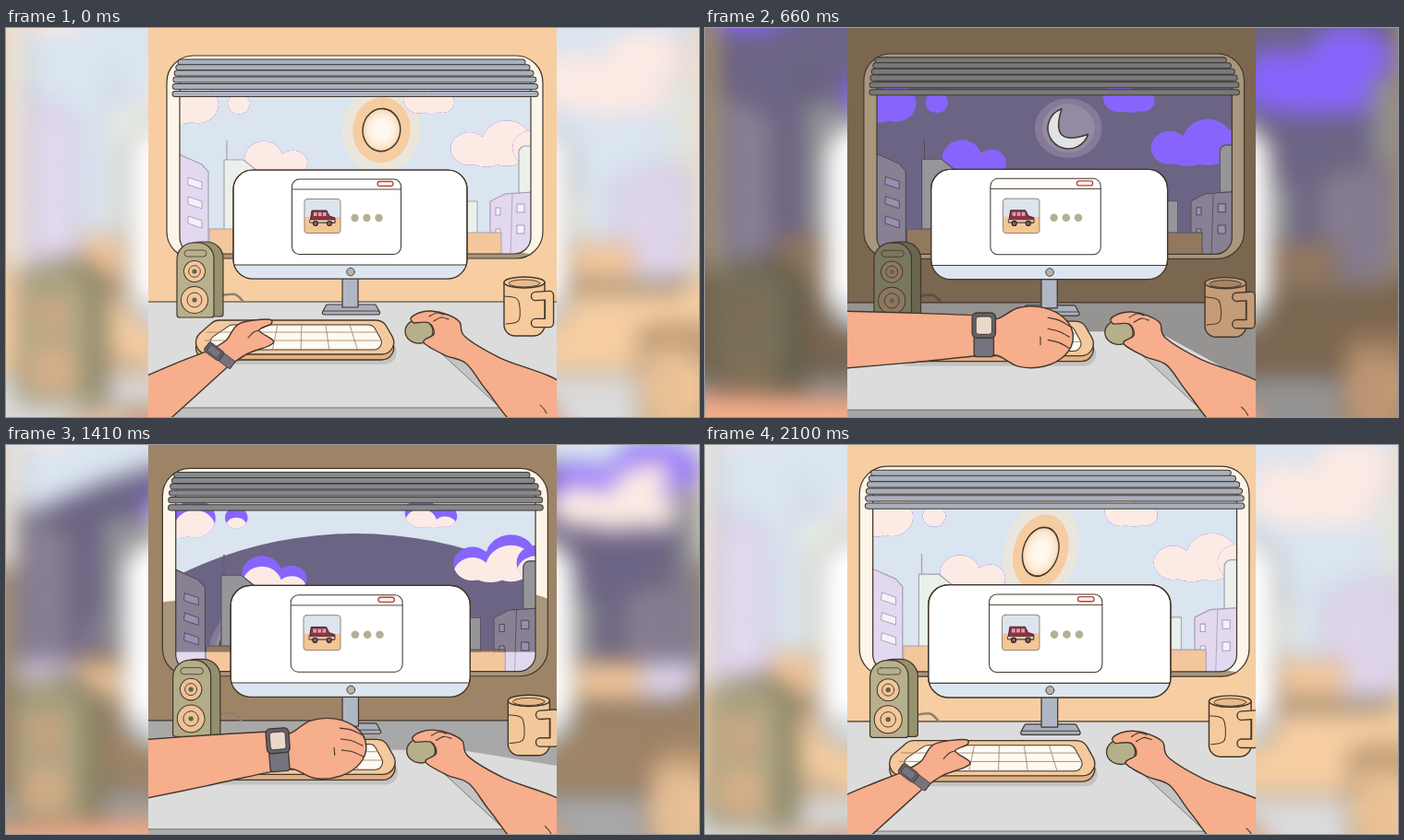
Recreate the animation shown at these times as an HTML page with a canvas. Size 750 by 422 pixels, loop 2.13 s.

```html
<!DOCTYPE html>
<html lang="en">
<head>
<meta charset="utf-8">
<title>Desk by day and night</title>
<style>
html, body { margin: 0; width: 100%; height: 100%; overflow: hidden; background: #ddd; }
canvas { display: block; width: 750px; height: 422px; }
</style>
</head>
<body>
<canvas id="stage" width="750" height="422"></canvas>
<script>
const LOOP = 2130, DAY = LOOP / 2;
const INK = '#43372c', SKIN = '#f6ae8c', CLAY = '#f4c99d', WHITE = '#fff';
const stage = document.getElementById('stage').getContext('2d');
const room = document.createElement('canvas');
room.width = 750;
room.height = 422;
const c = room.getContext('2d');

const lerp = (a, b, k) => a + (b - a) * k;
const ramp = (v, a, b) => Math.max(0, Math.min(1, (v - a) / (b - a)));
const smooth = k => k * k * (3 - 2 * k);
const rgb = h => [1, 3, 5].map(i => parseInt(h.slice(i, i + 2), 16));
function mix(a, b, k) {
  const q = rgb(b);
  return `rgb(${rgb(a).map((v, i) => Math.round(lerp(v, q[i], k)))})`;
}

function paint(path, fill, line = INK, width = 1.2) {
  if (fill) { c.fillStyle = fill; c.fill(path); }
  if (line) { c.strokeStyle = line; c.lineWidth = width; c.stroke(path); }
}
function poly(pts, fill, line, width) {
  const p = new Path2D();
  pts.forEach(q => p.lineTo(...q));
  if (fill) p.closePath();
  paint(p, fill, line, width);
}
function curve(pts, fill, line, width) {
  const p = new Path2D(), at = i => pts[Math.max(0, Math.min(pts.length - 1, i))];
  p.moveTo(...pts[0]);
  for (let i = 0; i < pts.length - 1; i++) {
    const [a, b, d, e] = [at(i - 1), at(i), at(i + 1), at(i + 2)];
    p.bezierCurveTo(b[0] + (d[0] - a[0]) / 6, b[1] + (d[1] - a[1]) / 6,
      d[0] - (e[0] - b[0]) / 6, d[1] - (e[1] - b[1]) / 6, ...d);
  }
  paint(p, fill, line, width);
}
// Trapezoid with rounded corners, given its upper and lower edge.
function slab(y1, l1, r1, y2, l2, r2, radius, fill, line, width) {
  const p = new Path2D();
  p.moveTo((l1 + r1) / 2, y1);
  [[r1, y1], [r2, y2], [l2, y2], [l1, y1]].forEach((q, i, all) => p.arcTo(...q, ...all[(i + 1) % 4], radius));
  p.closePath();
  paint(p, fill, line, width);
}
function box(x, y, w, h, r, fill, line, width) {
  const p = new Path2D();
  p.roundRect(x, y, w, h, r);
  paint(p, fill, line, width);
}
function oval(x, y, rx, ry, fill, line, width) {
  const p = new Path2D();
  p.ellipse(x, y, rx, ry, 0, 0, 7);
  paint(p, fill, line, width);
}
function clipped(addShape, draw) {
  c.save();
  c.beginPath();
  addShape();
  c.clip();
  draw();
  c.restore();
}

// A large lobe, a smaller one to the given side, and a base between them.
function cloud(x, y, r, side, shift) {
  const lobe = (dx, dy, rx, ry) => {
    c.moveTo(x + dx + rx, y + dy);
    c.ellipse(x + dx, y + dy, rx, ry, 0, 0, 7);
  };
  const shape = () => {
    lobe(0, 0, r, r * .92);
    lobe(side * r * 1.5, r * .22, r * .75, r * .66);
    lobe(side * r * .8, r * .5, r * .8, r * .45);
  };
  clipped(shape, () => {
    c.fillStyle = '#8765fd';
    c.fillRect(150, 30, 450, 150);
    c.translate(0, shift);
    c.beginPath();
    shape();
    c.fillStyle = '#fcebe4';
    c.fill();
  });
}
function clouds(shift) {
  cloud(542, 125, 27, -1, shift);
  cloud(568, 130, 20, 0, shift);
  cloud(279, 142, 21, 1, shift);
  cloud(208, 83, 22, -1, shift);
  cloud(252, 82, 12, 0, shift);
  cloud(447, 77, 17, 1, shift);
}

// Damped swing out from behind the screen; the setting mirrors the rising.
function orbit(p, rise, set, draw) {
  const age = Math.min(p - rise, set - p), side = p - rise < set - p ? 1 : -1;
  if (age <= 0) return;
  const pull = Math.exp(-age / 30), turn = side * 40 * pull;
  c.save();
  c.translate(393 - side * 140 * pull * Math.cos(age / 25), 110 + 100 * Math.exp(-age / 11));
  c.rotate(turn * Math.PI / 180);
  c.scale(1 - .35 * pull, 1 + .5 * pull);
  draw(turn);
  c.restore();
}
function sun() {
  oval(0, 0, 45, 44, '#ebe6dc', null);
  oval(0, 0, 33, 33, '#f6cda1', null);
  const g = c.createRadialGradient(0, 0, 8, 0, 0, 21);
  g.addColorStop(0, '#fff8f0');
  g.addColorStop(.6, '#fdebd7');
  g.addColorStop(1, '#f8d6b1');
  oval(0, 0, 21.5, 21.5, g, INK, 1.5);
}
function moon(turn) {
  oval(0, 0, 36, 32, '#857b98', null);
  oval(0, 0, 28, 26, '#938ba3', null);
  c.rotate((turn - 46) * Math.PI / 180);
  const p = new Path2D();
  p.arc(0, 0, 22, 1.1, -1.1);
  p.quadraticCurveTo(-30, 0, 22 * Math.cos(1.1), 22 * Math.sin(1.1));
  p.closePath();
  paint(p, '#dfe3e4', INK, 1.5);
}

function city(night) {
  const pick = (day, dark) => night ? dark : day;
  const violet = pick('#e2d8f0', '#888093'), pale = pick('#eaf1ea', '#96969a'), clay = pick('#f3c79b', '#92785f');
  const edge = pick('#a79fb4', '#514a59'), glass = pick('#f5f1fa', '#9a8fb2');
  const block = (x, y, w, h, color) => box(x, y, w, h, 0, color, edge, 1);
  poly([[185, 136], [212, 148], [219, 156], [219, 250], [185, 250]], violet, edge);
  for (let y = 162; y < 210; y += 21) poly([[197, y], [212, y + 5], [212, y + 13], [197, y + 8]], glass, edge, .9);
  poly([[239, 122], [239, 145]], null, edge);
  poly([[236, 220], [236, 143], [257, 143], [272, 155], [272, 220]], pale, edge);
  block(220, 218, 36, 30, clay);
  box(555, 128, 30, 70, 7, pale, edge);
  block(490, 188, 20, 37, pale);
  poly([[524, 250], [524, 188], [540, 180], [570, 178], [570, 250]], violet, edge);
  poly([[548, 180], [546, 245]], null, edge, .8);
  for (const y of [191, 214]) {
    block(553, y, 8, 9, glass);
    block(530, y + 4, 5, 8, glass);
  }
  block(490, 222, 46, 26, clay);
}

function windowView(p, n, sweep) {
  const outer = [174, 30, 407, 220, 29], inner = [188, 39, 380, 206, 18];
  box(...outer, '#fdf5e9', null);
  clipped(() => c.roundRect(...outer), () => {
    const y = 250 - 220 * sweep(333, 370, 918, 955);
    curve([[165, y], [378, y - 20], [590, y], [590, 290], [165, 290]], '#a8977d', null);
  });
  box(...outer, null);
  clipped(() => c.roundRect(...inner), () => {
    const sky = ['#dae5f0', '#6c6484'], dusk = p < 600;
    const grow = dusk ? ramp(p, 328, 368) : ramp(p, 921, 964);
    const radius = 330 + 200 * grow;
    c.fillStyle = sky[dusk ? 0 : 1];
    c.fillRect(180, 30, 400, 220);
    if (grow) oval(378, 519, radius, radius, sky[dusk ? 1 : 0], null);
    orbit(dusk ? p : p - DAY, -55, 300, sun);
    orbit(p, 345, 905, moon);
    clouds(60 * sweep(340, 372, 922, 953));
    city(false);
    const shade = 120 * sweep(335, 349, 922, 970);
    clipped(() => c.rect(180, 100, 400, shade && 30 + shade), () => city(true));
  });
  box(...inner, null);
  const slat = mix('#a9b0bd', '#77797b', n);
  for (let i = 0; i < 6; i++) {
    const inset = (1 - i / 5) ** 2, y = 34 + 5.5 * i + .28 * i * i;
    box(180 + 6 * inset, y, 396 - 20 * inset, 6, 3, slat, INK, 1);
  }
}

function speaker(n) {
  const body = mix('#b7b08c', '#7a775f', n), cone = mix('#f3c79b', '#8c7860', n);
  curve([[234, 290], [248, 289], [257, 297]], null, mix('#8a8378', '#5a5046', n), 2.5);
  box(189, 232, 46, 81, [20, 18, 3, 3], mix('#96916f', '#69664f', n));
  box(185, 233, 40, 81, [18, 17, 3, 3], body);
  box(193, 241, 24, 7, 3.5, null, INK, .8);
  for (const [y, r] of [[264, 11.5], [295, 14.5]]) {
    oval(204, y, r, r, cone, INK, 1);
    oval(204, y, r * .55, r * .55, null, INK, .9);
    oval(204, y, 2.6, 2.6, '#6b5e4b', null);
  }
}

function mug(n) {
  const clay = mix('#f5cb9d', '#c59c78', n);
  const grip = [[573, 291], [588, 290], [588, 320], [573, 320]];
  box(539, 273, 44, 61, [4, 4, 12, 12], clay, INK, 1.4);
  c.lineCap = c.lineJoin = 'round';
  poly(grip, null, INK, 10.5);
  poly(grip, null, clay, 7.8);
  oval(561, 276, 22, 6, clay, INK, 1.4);
  oval(561, 277, 17, 4, mix('#e9bb8b', '#a88465', n), INK, .9);
  box(530, 292, 25, 28, 5, null, null);
  curve([[540, 291], [554, 295], [555, 317], [541, 321]], null, INK, 1);
}

function car() {
  const frame = [323, 185.5, 39, 37, 3];
  box(...frame, '#dde4ee', null);
  box(323, 205, 39, 17.5, [0, 0, 3, 3], '#f3c697', null);
  poly([[329, 211], [331, 198], [347, 198], [350, 204], [356, 206], [356, 211]], '#8f3149', '#3c2029', .9);
  for (let x = 333; x < 346; x += 5) box(x, 200, 3.6, 4, 0, '#d9a4a2', null);
  box(329, 208, 27, 3, 0, '#ead3a4', '#3c2029', .6);
  for (const x of [335, 350]) oval(x, 212, 2.5, 2.5, '#77686a', '#2a2226', 1.1);
  box(...frame, null, '#8d7d6c', .9);
}
function monitor() {
  const shell = [246, 154, 253, 118, 21];
  slab(300, 347, 400, 311, 341, 406, 2, '#a9b0bd');
  poly([[343, 307], [404, 307]], null, INK, .9);
  box(364, 270, 17, 33, 0, '#b0b7c4');
  box(...shell, WHITE);
  clipped(() => c.roundRect(...shell), () => box(240, 257, 265, 20, 0, '#dde6f0', INK, 1));
  box(...shell, null);
  oval(373, 264.5, 4.3, 4.3, '#b5b5ab', INK, .9);
  box(309.5, 164, 118, 81.5, 8, WHITE, INK, 1);
  poly([[309.5, 175], [427.5, 175]], null, INK, .9);
  box(402, 166.5, 17, 5, 2.5, '#fff2ee', '#b6433f', 1.3);
  for (let i = 0; i < 3; i++) oval(377.5 + 13 * i, 206, 4.2, 4.2, '#b5b093', null);
  car();
}

function keyboard() {
  const deck = (dx, dy, ...style) => slab(317 + dy, 226 + dx, 408 + dx, 354 + dy, 184 + dx, 429 + dx, 13, ...style);
  deck(3, 11, '#c3c3c2', null);
  deck(0, 6, '#e3b083', INK, 1.3);
  deck(0, 0, CLAY, INK, 1.3);
  slab(322, 243, 397, 349, 203, 412, 8, '#fffaf2', INK, 1);
  for (const y of [330, 339]) poly([[300 - y * .25, y], [250 + y * .46, y]], null, '#9c7c59', .8);
  for (let x = 268; x < 380; x += 26) poly([[x, 322], [x + (x - 325) * .18, 349]], null, '#9c7c59', .8);
}

// Open typing hand, relative to the wrist; the fist is an oval around the same joint.
const TYPING = [[7, -16], [21, -34], [52, -39], [56, -34], [43, -27], [58, -16], [53, -10], [31, -2], [14, 9]];
function leftArm(t) {
  const lift = smooth(ramp(t, 150, 470)) - ramp(t, 1180, 1980) ** 2;
  const fist = smooth(ramp(lift, 0, .4)), size = lerp(.65, 1, lift);
  const x = lerp(231, 303, lift), y = lerp(355, 331, lift) - 72 * lift * (1 - lift);
  const top = lerp(380, 306, lift * lift), bottom = lerp(452, 368, lift * lift);
  const angle = lerp(-53, 0, lift) * Math.PI / 180;
  const at = (px, py) => {
    const s = Math.sin(angle) * size, o = Math.cos(angle) * size;
    return [x + px * o - py * s, y + px * s + py * o];
  };
  const hand = TYPING.map(([px, py], i) => {
    const a = lerp(-2.5, 2.5, i / (TYPING.length - 1));
    const [fx, fy] = at(50 + 45 * Math.cos(a), 3 + 33 * Math.sin(a));
    return [lerp(x + px, fx, fist), lerp(y + py, fy, fist)];
  });
  const up = at(-5, -20), down = at(-5, 23);
  const half = (a, b) => [(146 + a[0]) / 2, (b + a[1]) / 2];
  curve([[146, top], half(up, top - 1), up, ...hand, down, half(down, bottom + 1), [146, bottom]], SKIN, INK, 1.4);
  if (fist > .5) {
    for (let i = 0; i < 3; i++) {
      const cy = -18 + 12 * i;
      curve([at(68, cy), at(80, cy + 3), at(91, cy + 9)], null, INK, 1.1);
    }
    curve([at(60, 3), at(60, 11)], null, INK, 1.1);
  } else {
    curve([[x + 43, y - 27], [x + 37, y - 25], [x + 31, y - 19]], null, INK, 1.1);
  }
  c.save();
  c.translate(x, y);
  c.rotate(angle);
  c.scale(lerp(.75, 1, fist) * size, lerp(1.15, 1, fist) * size);
  box(-11, -21, 21, 45, 3, '#74737f', INK, 1.3);
  box(-13, -23, 25, 27, 5, '#63626d', INK, 1.3);
  box(-9, -19, 17, 19, 3, mix('#74737f', '#ead9cb', fist), INK, .9);
  c.restore();
}

function rightArm() {
  poly([[468, 350], [537, 414], [552, 414], [500, 356]], '#c4c4c4', null);
  poly([[468, 350], [537, 414]], null, '#77736f', .9);
  oval(447, 329, 15, 13, '#b5b08a', INK, 1.3);
  curve([[441, 320], [438, 315], [447, 309], [460, 307], [478, 311], [491, 319], [497, 335], [535, 358], [606, 389],
    [606, 440], [556, 434], [520, 393], [498, 364], [475, 355], [452, 341], [463, 332], [458, 320], [441, 320]], SKIN, INK, 1.4);
  for (const d of [0, 5]) curve([[458 + d, 313 + d], [466 + d, 309 + d], [474 + d, 311 + d]], null, INK, 1.1);
  curve([[578, 409], [582, 413], [585, 418]], null, INK, 1);
}

function desk(n, late) {
  const edge = 345 + 50 * late;
  box(140, 297, 480, 140, 0, mix('#dcdcdc', '#959493', n), INK, 1.1);
  poly([[215, 328], [488, 328], [610, edge], [610, 412], [140, 412], [140, edge - 20]], '#dcdcdc', null);
  box(140, 412, 480, 30, 0, mix('#bfbfbf', '#a5a5a4', n), '#77736f', 1.1);
}

function drawRoom(t) {
  const p = t % DAY;
  const sweep = (a, b, d, e) => ramp(p, a, b) - ramp(p, d, e);
  const n = sweep(283, 371, 876, 966), late = sweep(343, 390, 915, 965);
  const zoom = 1 + .037 * t / LOOP;
  c.setTransform(1, 0, 0, 1, 0, 0);
  c.fillStyle = mix('#f6cea2', '#7b6650', n);
  c.fillRect(0, 0, 750, 422);
  c.translate(362, 219);
  c.scale(zoom, zoom);
  c.translate(-362, -219);
  windowView(p, n, sweep);
  desk(n, late);
  speaker(late);
  mug(late);
  monitor();
  keyboard();
  rightArm();
  leftArm(t);
}

function frame(now) {
  drawRoom(now % LOOP);
  // An enlarged, blurred copy fills the sides.
  const w = 442 * 1.9, h = 422 * 1.9;
  stage.filter = 'blur(13px)';
  stage.drawImage(room, 154, 0, 442, 422, 375 - w / 2, 211 - h / 2, w, h);
  stage.filter = 'none';
  stage.drawImage(room, 154, 0, 442, 422, 154, 0, 442, 422);
  requestAnimationFrame(frame);
}
requestAnimationFrame(frame);
</script>
</body>
</html>
```
